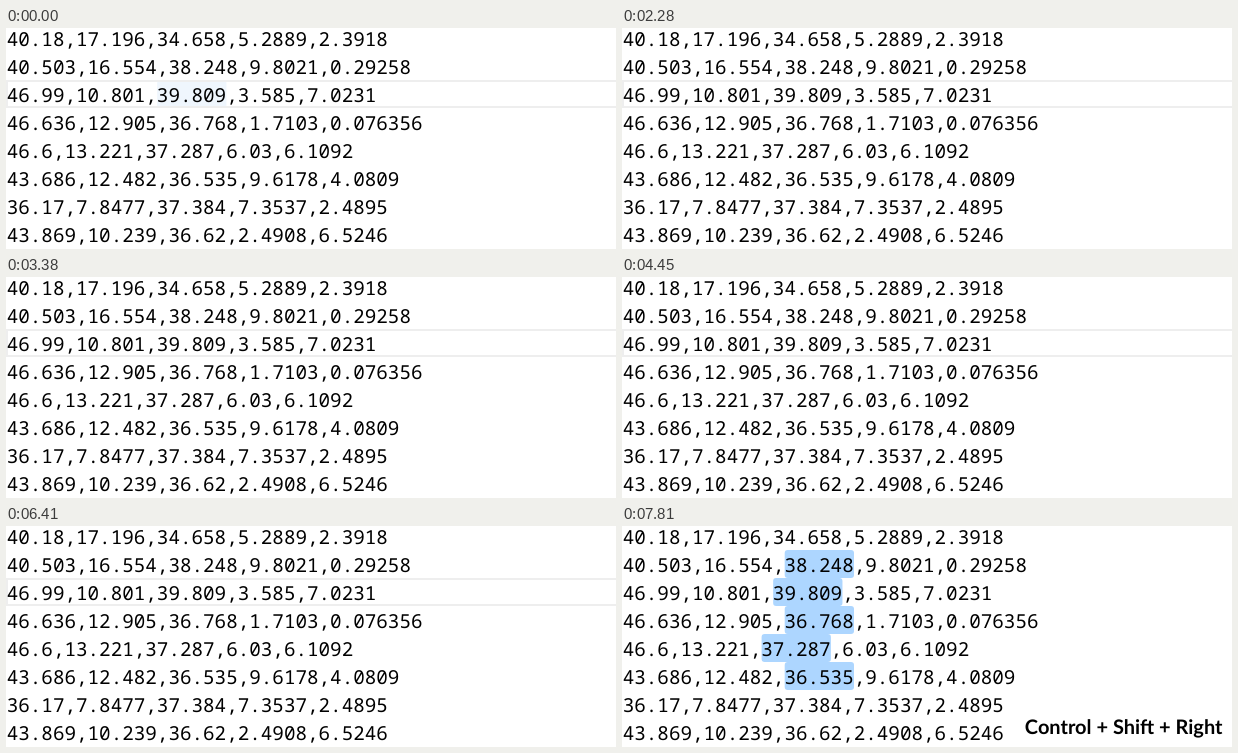
Animation, 610 px wide and 221 px high, one loop 8000 ms. Source, as an HTML page with a canvas:

```html
<!DOCTYPE html>
<html lang="en">
<head>
<meta charset="utf-8">
<title>Column editing</title>
<style>
  html, body { margin: 0; width: 100%; height: 100%; overflow: hidden; background: #fff; }
  canvas { display: block; width: 610px; height: 221px; }
</style>
</head>
<body>
<canvas id="stage" width="610" height="221"></canvas>
<script>
const ctx = document.getElementById('stage').getContext('2d');
const LOOP = 8000;
const CHAR = 11.55, ROW = 28, LEFT = 0.7, TOP = -4;
const MONO = '19.25px "Noto Sans Mono", "DejaVu Sans Mono", monospace';
const LABEL = 'bold 20px Lato, "Open Sans", sans-serif';

const lines = [
  '40.18,17.196,34.658,5.2889,2.3918',
  '40.503,16.554,38.248,9.8021,0.29258',
  '46.99,10.801,39.809,3.585,7.0231',
  '46.636,12.905,36.768,1.7103,0.076356',
  '46.6,13.221,37.287,6.03,6.1092',
  '43.686,12.482,36.535,9.6178,4.0809',
  '36.17,7.8477,37.384,7.3537,2.4895',
  '43.869,10.239,36.62,2.4908,6.5246'
];

const DOWN = 'Alt + Control + Down';
const UP = 'Alt + Control + Up';
const RIGHT = 'Control + Shift + Right';

// [time, value] steps; each value holds until the next one
const caption = [[0, ''], [1420, DOWN], [2280, ''], [2430, DOWN], [3380, ''],
  [3610, DOWN], [4450, ''], [5630, UP], [6410, ''], [6710, RIGHT]];
const caret = [[0, false], [500, true], [960, false], [1420, true], [1970, false],
  [2430, true], [3060, false], [3610, true], [4140, false], [4680, true],
  [5230, false], [5630, true], [6160, false], [6710, true], [7260, false],
  [7350, true], [7810, false]];
const firstRow = [[0, 2], [5700, 1]];
const lastRow = [[0, 2], [1420, 3], [2600, 4], [3680, 5]];
const selected = [[0, 0], [6800, 2], [7350, 6]];

function at(steps, t) {
  let value = steps[0][1];
  for (const [time, v] of steps) if (t >= time) value = v;
  return value;
}

// Column just after the second comma
const anchor = line => line.indexOf(',', line.indexOf(',') + 1) + 1;
const rowY = row => TOP + row * ROW;

function block(row, col, count, color) {
  ctx.fillStyle = color;
  ctx.beginPath();
  ctx.roundRect(1 + col * CHAR, rowY(row), count * CHAR, ROW, 3);
  ctx.fill();
}

function currentLine(row) {
  ctx.fillStyle = '#eee';
  ctx.fillRect(0, rowY(row), 610, 2);
  ctx.fillRect(0, rowY(row) + ROW - 2, 610, 2);
  ctx.fillRect(0, rowY(row), 2, ROW);
}

function drawText() {
  ctx.font = MONO;
  ctx.textAlign = 'left';
  ctx.fillStyle = '#000';
  lines.forEach((line, row) => {
    for (let i = 0; i < line.length; i++) {
      ctx.fillText(line[i], LEFT + i * CHAR, rowY(row) + 22);
    }
  });
}

function drawCaption(text) {
  if (!text) return;
  ctx.font = LABEL;
  ctx.textAlign = 'right';
  ctx.fillStyle = '#000';
  ctx.fillText(text, 600.5, text === RIGHT ? 208 : 207);
}

function draw(t) {
  const from = at(firstRow, t), to = at(lastRow, t), count = at(selected, t);
  ctx.fillStyle = '#fff';
  ctx.fillRect(0, 0, 610, 221);

  if (t < 500) block(2, anchor(lines[2]), 6, '#eff6fd');
  if (!count) currentLine(2);
  for (let row = from; count && row <= to; row++) {
    block(row, anchor(lines[row]), count, '#add6ff');
  }

  drawText();

  if (at(caret, t)) {
    ctx.fillStyle = '#000';
    for (let row = from; row <= to; row++) {
      const x = Math.round((anchor(lines[row]) + count) * CHAR);
      ctx.fillRect(x, rowY(row), 2, ROW);
    }
  }
  drawCaption(at(caption, t));
}

ctx.textRendering = 'geometricPrecision';
const start = performance.now();
function tick() {
  draw((performance.now() - start) % LOOP);
  requestAnimationFrame(tick);
}
tick();
</script>
</body>
</html>
```
